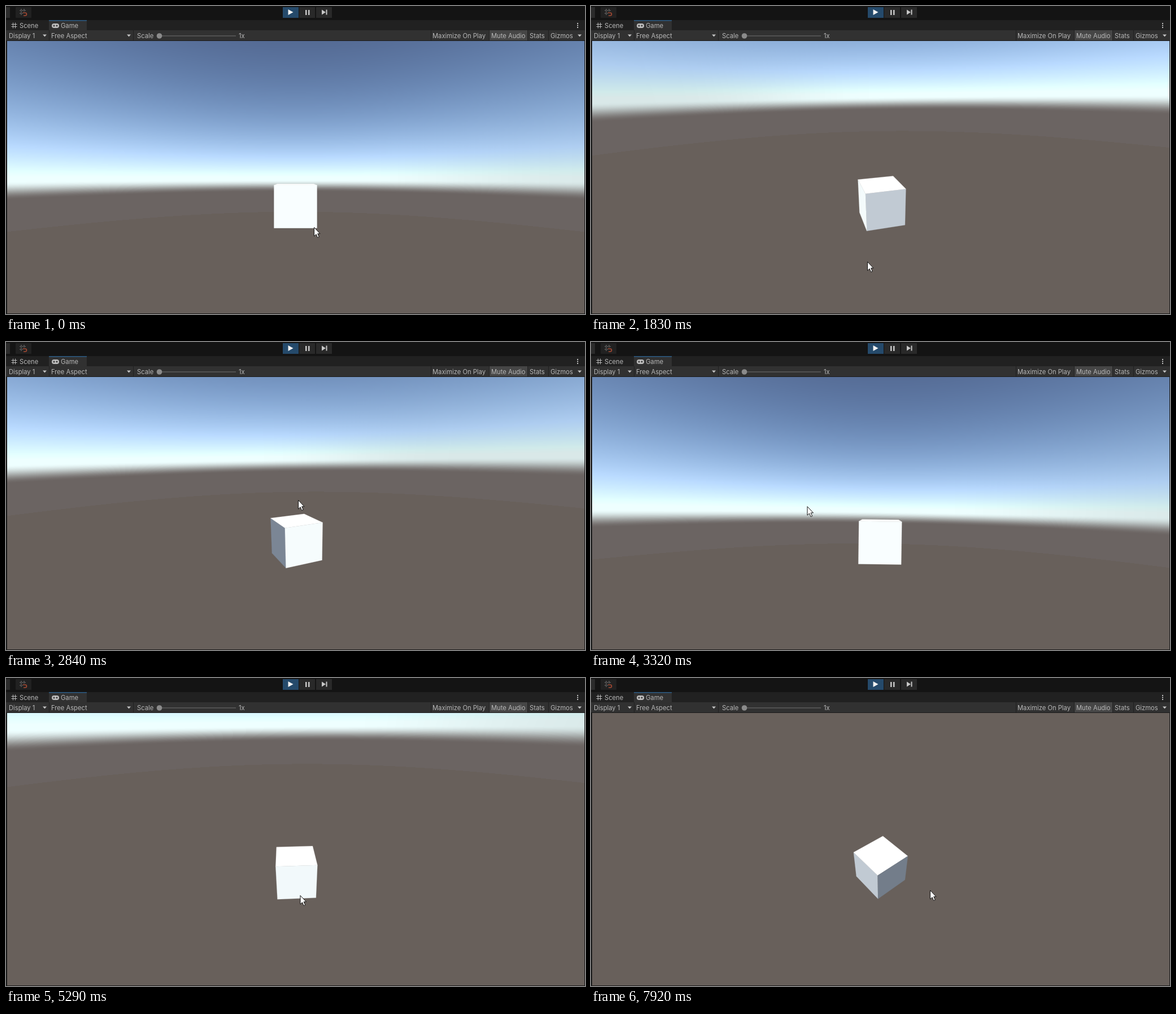
Animation, 1025 px wide and 546 px high, one loop 8000 ms. Source, as an HTML page with a canvas:

```html
<!DOCTYPE html>
<html lang="en">
<head>
<meta charset="utf-8">
<title>Orbit camera</title>
<style>
html, body { margin: 0; width: 100%; height: 100%; overflow: hidden; background: #191919; }
canvas, svg { position: absolute; left: 0; top: 0; }
canvas { left: 2px; top: 62px; }
text { font: 11.2px Inter, Roboto, sans-serif; fill: #b8b8b8; }
</style>
</head>
<body>
<canvas id="view" width="1022" height="483"></canvas>
<svg width="1025" height="546" viewBox="0 0 1025 546">
  <rect width="1025" height="25" fill="#141414"/>
  <rect y="25" width="1025" height="18" fill="#212121"/>
  <rect y="43" width="1025" height="18" fill="#313131"/>
  <rect y="61" width="1025" height="1" fill="#1b1b1b"/>
  <rect y="2" width="7" height="19" fill="#2b2b2b"/>
  <rect x="17" y="2" width="28" height="19" rx="1" fill="#212121"/>
  <path d="M27 5v12M32 5v5M24 8h12M24 13h6" stroke="#777" stroke-dasharray="3 1" fill="none"/>
  <path d="M30 12h4a2.3 2.3 0 0 1 0 5h-3" stroke="#a44a33" stroke-width="1.6" fill="none"/>
  <rect x="490" y="2" width="28" height="19" fill="#254a6b"/>
  <path d="M519 2h28v19h-28zM549 2h28v19h-28z" fill="#292929"/>
  <path d="M499.500 6l9 5-9 5z" fill="#f2f2f2"/>
  <path d="M530 7h2.500v9h-2.500zM535 7h2.500v9h-2.500zM559 6.500l7 4.500-7 4.500zM566.500 6.500h2v9h-2z" fill="#c8c8c8"/>

  <rect x="76" y="25" width="67" height="18" fill="#313131"/>
  <rect x="76" y="25" width="67" height="1.500" fill="#2c5d87"/>
  <path d="M12.500 29.500v10M16.500 29.500v10M9.500 32.500h10M9.500 36.500h10" stroke="#b8b8b8"/>
  <rect x="81" y="31" width="13" height="8" rx="4" fill="#bdbdbd"/>
  <path d="M83 35h4M85 33v4" stroke="#313131"/>
  <circle cx="90" cy="35" r="1.400" fill="#313131"/>
  <path d="M1011 30h2v2h-2zM1011 33.500h2v2h-2zM1011 37h2v2h-2z" fill="#c4c4c4"/>
  <rect x="856" y="43" width="67" height="18" fill="#464646"/>
  <path d="M76.500 43v18M225.500 43v18M752.500 43v18M855.500 43v18M923.500 43v18M960.500 43v18" stroke="#202020"/>
  <path d="M65 50.500h7l-3.500 4zM214 50.500h7l-3.500 4zM1012 50.500h7l-3.500 4z" fill="#c4c4c4"/>
  <path d="M272 53h135" stroke="#5c5c5c" stroke-width="1.500"/>
  <circle cx="271.500" cy="53" r="4.800" fill="#8b8b8b"/>
  <text x="24" y="39">Scene</text><text x="97" y="39">Game</text>
  <text x="5" y="57">Display 1</text><text x="80" y="57">Free Aspect</text>
  <text x="232" y="57">Scale</text><text x="412" y="57">1x</text>
  <text x="755" y="57">Maximize On Play</text><text x="859" y="57">Mute Audio</text>
  <text x="927" y="57">Stats</text><text x="964" y="57">Gizmos</text>
  <path id="cursor" d="M.5.5v15.500l3.600-3.300 2.500 5.800 2.600-1.100-2.500-5.700h4.300z" fill="#fff" stroke="#111"/>
</svg>
<script>
const W = 1022, H = 483, CX = 510.5, CY = 241.2, FOCAL = 418;
const DIST = 6, LIFT = 0.69, LOOP = 8000;
const ctx = view.getContext('2d');
const img = ctx.createImageData(W, H);
const px = new Uint32Array(img.data.buffer);

// time, orbit, pitch (degrees) where a drag starts, turns or ends
const camera = [
  [800, 0, 0], [1080, 37.7, 9.5], [1530, 100, 14], [1830, 75.2, 19.4],
  [2130, 0, 42], [2450, -14, 45], [2840, -24.7, 13.5], [3320, 0, 1],
  [4680, 0, 1], [5040, -.3, -2.8], [5410, -4, 45], [6830, -4, 45],
  [6990, 58, 45], [7380, 58, 45], [7800, 140.4, 45]
];
// time, x, y where the pointer turns
const mouse = [
  [0, 545, 392], [280, 472, 340], [420, 608, 340], [700, 643, 360],
  [1080, 431, 408], [1350, 372, 412], [1830, 489, 453], [2070, 768, 495],
  [2450, 480, 445], [2840, 517, 280], [3700, 276, 300], [4300, 556, 430],
  [4540, 520, 267], [5040, 514, 291], [5410, 524, 436], [6220, 524, 436],
  [6730, 596, 345], [6990, 339, 350], [7380, 647, 370], [7650, 315, 406],
  [7920, 600, 376]
];
// bursts of 120 ms steps begin at these times
const bursts = [0, 160, 420, 580, 840, 1350, 2450, 2600, 3700, 4680, 5560,
  6080, 6220, 6870, 7260, 7650, 7800, LOOP];

const clamp = x => Math.min(1, Math.max(0, x));
const smooth = x => (x = clamp(x), x * x * (3 - 2 * x));
const mix = (a, b, k) => a.map((v, i) => v + (b[i] - v) * k);

function sample(keys, t) {
  const i = keys.findIndex(k => k[0] > t);
  if (i < 0) return keys[keys.length - 1].slice(1);
  if (i === 0) return keys[0].slice(1);
  const a = keys[i - 1], b = keys[i];
  return mix(a, b, (t - a[0]) / (b[0] - a[0])).slice(1);
}

// haze thins exponentially with s, the sine of elevation; duller beside the sun
function skyColour(s, sun) {
  const h = Math.max(0, s);
  const fade = 1 - .09 * sun * Math.exp(-h / .2);
  const haze = (base, amount, depth) =>
    fade * Math.min(255, base + amount * Math.exp(-h / depth));
  const air = [haze(66, 172, .225), haze(70, 195, .3), haze(90, 203, .4)];
  const ground = s > -.146 ? [107, 100, 98] : [104, 96, 91];
  return mix(air, ground, smooth((-.012 - s) / .05));
}

// ramp[sun][elevation], packed pixels
const LOW = -.2, STEPS = 1600, TONES = 32;
const ramp = Array.from({ length: TONES + 1 }, (_, g) =>
  Uint32Array.from({ length: STEPS }, (_, i) => {
    const [r, gr, b] = skyColour(LOW + i / STEPS, g / TONES).map(Math.round);
    return (255 << 24 | b << 16 | gr << 8 | r) >>> 0;
  }));

function drawSky(so, co, sp, cp, sr, cr) {
  const sunRight = .5 * co - .866 * so, sunAhead = -.5 * so - .866 * co;
  for (let j = 0, n = 0; j < H; j++) {
    const y = j + .5 - CY;
    for (let i = 0; i < W; i++, n++) {
      const x = i + .5 - CX;
      const right = x * cr + y * sr, up = x * sr - y * cr;
      const rise = up * cp - FOCAL * sp, ahead = FOCAL * cp + up * sp;
      const flat = right * right + ahead * ahead;
      const s = rise / Math.sqrt(flat + rise * rise);
      if (s < -.15) { px[n] = ramp[0][0]; continue; }
      const sun = (right * sunRight + ahead * sunAhead) / Math.sqrt(flat);
      px[n] = ramp[smooth((sun + .75) / .7) * TONES | 0][Math.min(STEPS - 1, (s - LOW) * STEPS | 0)];
    }
  }
  ctx.putImageData(img, 0, 0);
}

function drawCube(so, co, sp, cp, sr, cr, pitch) {
  const eye = [DIST * cp * so, LIFT + DIST * sp, -DIST * cp * co];
  const project = ([x, y, z]) => {
    const ahead = z * co - x * so, h = y - LIFT;
    const scale = FOCAL / (DIST + ahead * cp - h * sp);
    const u = (x * co + z * so) * scale, v = -(h * cp + ahead * sp) * scale;
    return [CX + u * cr - v * sr, CY + u * sr + v * cr];
  };
  const tilt = clamp(pitch / 45);
  const shade = mix([127, 138, 154], [115, 125, 138], tilt);
  const front = mix([249, 254, 255], [238, 246, 249], tilt);
  const colours = [[shade, [193, 202, 211]], [shade, [255, 255, 255]], [front, shade]];
  for (let axis = 0; axis < 3; axis++) for (const side of [-.5, .5]) {
    if (eye[axis] * Math.sign(side) <= .5) continue;
    ctx.beginPath();
    for (const [a, b] of [[-.5, -.5], [.5, -.5], [.5, .5], [-.5, .5]]) {
      const p = [];
      p[axis] = side; p[(axis + 1) % 3] = a; p[(axis + 2) % 3] = b;
      ctx.lineTo(...project(p));
    }
    ctx.closePath();
    ctx.fillStyle = ctx.strokeStyle = `rgb(${colours[axis][+(side > 0)].map(Math.round)})`;
    ctx.lineWidth = .3;
    ctx.fill();
    ctx.stroke();
  }
}

function stepped(t) {
  const i = bursts.findIndex(b => b > t) - 1, start = bursts[i];
  const last = Math.round((bursts[i + 1] - start) / 121) - 1;
  return start + 120 * Math.min(last, Math.floor((t - start) / 120));
}

let shown = -1;
function frame(now) {
  const t = stepped(now % LOOP);
  if (t !== shown) {
    shown = t;
    const [orbit, pitch] = sample(camera, t);
    // the view leans into a turn
    const roll = .8 * Math.tanh(orbit - sample(camera, t - 60)[0]);
    const trig = [orbit, pitch, roll].map(a => a * Math.PI / 180)
      .flatMap(a => [Math.sin(a), Math.cos(a)]);
    drawSky(...trig);
    drawCube(...trig, pitch);
    cursor.setAttribute('transform', `translate(${sample(mouse, t)})`);
  }
  requestAnimationFrame(frame);
}
frame(performance.now());
</script>
</body>
</html>
```
